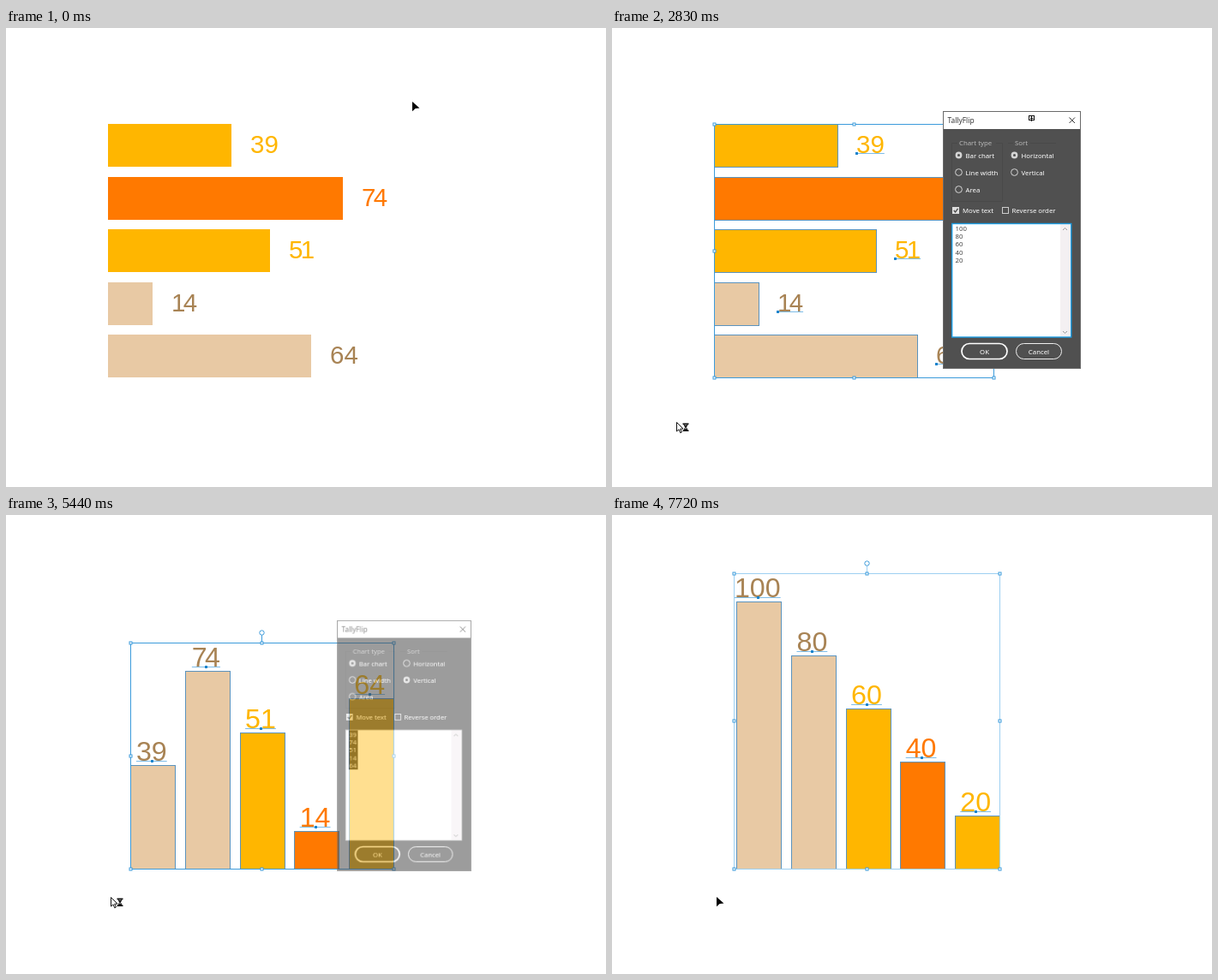
These frames come from a looping animation (700x536 px, 8 s). An HTML page with a canvas:

```html
<!DOCTYPE html>
<html lang="en">
<head>
<meta charset="utf-8">
<title>Bar chart editing</title>
<style>
html, body { margin: 0; width: 100%; height: 100%; overflow: hidden; background: #fff; }
canvas { display: block; }
</style>
</head>
<body>
<canvas id="stage" width="700" height="536"></canvas>
<script>
const stage = document.getElementById('stage').getContext('2d');
const panelCanvas = document.createElement('canvas');
const PANEL_W = panelCanvas.width = 161, PANEL_H = panelCanvas.height = 301;
const panel = panelCanvas.getContext('2d');
let ctx = stage;

const LOOP = 8000;
const YELLOW = '#ffb600', ORANGE = '#ff7900', TAN = '#e8c9a4', BROWN = '#a88354';
const BLUE = '#3c9bdb', PALE_BLUE = '#9dd0f2';
const BEFORE = [39, 74, 51, 14, 64], AFTER = [100, 80, 60, 40, 20];

// Times are in ms within the loop.
const scenes = [
  {
    start: 0, vertical: false, colors: [YELLOW, ORANGE, YELLOW, TAN, TAN],
    from: [474, 86], to: [75, 460], dialog: [386, 97],
    drag: 1030, select: 1430, wait: 1530, open: 1590, grip: 1900, paste: 2320,
    press: 3160, close: 3550, apply: 3880, done: 4420
  },
  {
    start: 4690, vertical: true, colors: [TAN, TAN, YELLOW, ORANGE, YELLOW],
    from: [512, 98], to: [122, 446], dialog: [384, 119],
    drag: 4690, select: 5095, wait: 5270, open: 5380, grip: 5600, paste: 6040,
    press: 6490, close: 6790, apply: 7090, done: 7720
  }
];

const clamp = x => Math.max(0, Math.min(1, x));
const smooth = x => x * x * (3 - 2 * x);
const easeOut = x => 1 - (1 - x) ** 2;

function fill(color, x, y, w, h) {
  ctx.fillStyle = color;
  ctx.fillRect(x, y, w, h);
}

function box(color, x, y, w, h, width = 1) {
  ctx.strokeStyle = color;
  ctx.lineWidth = width;
  ctx.strokeRect(x, y, w, h);
}

function line(color, width, ...points) {
  ctx.strokeStyle = color;
  ctx.lineWidth = width;
  ctx.beginPath();
  for (let i = 0; i < points.length; i += 2) ctx.lineTo(points[i], points[i + 1]);
  ctx.stroke();
}

function polygon(color, outline, ...points) {
  ctx.beginPath();
  for (let i = 0; i < points.length; i += 2) ctx.lineTo(points[i], points[i + 1]);
  ctx.closePath();
  ctx.fillStyle = color;
  ctx.fill();
  if (outline) {
    ctx.strokeStyle = outline;
    ctx.lineWidth = 1;
    ctx.stroke();
  }
}

function circle(x, y, r, color, paint = 'stroke') {
  ctx.beginPath();
  ctx.arc(x, y, r, 0, Math.PI * 2);
  ctx.lineWidth = 1;
  ctx[paint + 'Style'] = color;
  ctx[paint]();
}

function label(text, x, y, color, size = 7.8, align = 'left') {
  ctx.font = `${size}px "Noto Sans", sans-serif`;
  ctx.textAlign = align;
  ctx.fillStyle = color;
  ctx.fillText(text, x, y);
}

function layout(scene, values) {
  const { vertical } = scene;
  const size = vertical ? 32.2 : 29.5;
  return values.map((value, i) => {
    const text = String(value);
    const kern = text === '74' || !vertical && /^(51|14)$/.test(text) ? 2.7 : 0;
    const width = text.length * size * .556 - kern;
    if (vertical) {
      const h = Math.round(value * 3.115), x = Math.round(145 + 63.8 * i), y = 413 - h;
      return { text, size, kern, width, x, y, w: 52, h, tx: 169.8 + 63.6 * i - width / 2, ty: y - 4.7 };
    }
    const w = Math.round(value * 3.7), y = Math.round(112 + 61.5 * i);
    return { text, size, kern, width, x: 119, y, w, h: 50, tx: 119 + w + 22, ty: y + 34 };
  });
}

function drawChart(scene, values, selected) {
  const bars = layout(scene, values);
  bars.forEach((bar, i) => {
    const color = scene.colors[i];
    fill(color, bar.x, bar.y, bar.w, bar.h);
    ctx.font = `${bar.size}px "Liberation Sans", Arial, sans-serif`;
    ctx.textAlign = 'left';
    ctx.fillStyle = color === TAN ? BROWN : color;
    ctx.fillText(bar.text[0], bar.tx, bar.ty);
    ctx.fillText(bar.text.slice(1), bar.tx + bar.size * .556 - bar.kern, bar.ty);
  });
  if (selected) drawSelection(scene, bars, scene.vertical && values === AFTER ? PALE_BLUE : BLUE);
}

function drawSelection(scene, bars, frameColor) {
  for (const b of bars) {
    box('#5b93bd', b.x + .5, b.y + .5, b.w, b.h);
    const y = Math.round(b.ty) + .5;
    line('#7dbce8', 1, b.tx, y, b.tx + b.width, y);
    fill('#1a84cc', Math.round(scene.vertical ? b.tx + b.width / 2 - 1 : b.tx - 1), y - 1.5, 3, 3);
  }
  const grid = v => Math.round(v) + .5;
  let left = 119.5, top = 112.5, right, bottom = 408.5;
  if (scene.vertical) {
    left = grid(Math.min(145, bars[0].tx) - .5);
    right = 452.5;
    bottom = 413.5;
    top = grid(Math.min(...bars.map(b => b.ty)) - 28.6);
  } else {
    right = grid(Math.max(...bars.map(b => b.tx + b.width)) - .6);
  }
  const cx = grid((left + right) / 2 - 1), cy = grid((top + bottom) / 2 - 1);
  box(frameColor, left, top, right - left, bottom - top);
  const knob = scene.vertical ? [cx, top - 12] : [right + 12, cy];
  line(frameColor, 1, scene.vertical ? cx : right, scene.vertical ? top : cy, ...knob);
  circle(...knob, 2.7, '#fff', 'fill');
  circle(...knob, 2.7, BLUE);
  for (const x of [left, cx, right]) {
    for (const y of [top, cy, bottom]) {
      if (x === cx && y === cy) continue;
      fill('#fff', x - 1.5, y - 1.5, 3, 3);
      box(BLUE, x - 1.5, y - 1.5, 3, 3);
    }
  }
}

function radio(x, y, text, checked) {
  circle(x, y, 3.9, '#d5d5d5', checked ? 'fill' : 'stroke');
  if (checked) circle(x, y, 1.5, '#505050', 'fill');
  label(text, x + 8, y + 3, '#fff');
}

function button(x, text, width, color) {
  ctx.beginPath();
  ctx.roundRect(x, 271.5, 53, 18, 9);
  ctx.strokeStyle = color;
  ctx.lineWidth = width;
  ctx.stroke();
  label(text, x + 26.5, 283.5, '#fff', 7.8, 'center');
}

function paintPanel(scene, t) {
  const pasted = t >= scene.paste, pressed = t >= scene.press + 30;
  const focused = t >= scene.open + 100;

  fill('#fff', 0, 0, PANEL_W, 21);
  fill('#505050', 0, 21, PANEL_W, PANEL_H - 21);
  box('#6a6a6a', .5, .5, PANEL_W - 1, PANEL_H - 1);
  label('TallyFlip', 5.5, 13.7, '#333', 8.4);
  line('#333', 1, 147.5, 7.5, 154, 14);
  line('#333', 1, 154, 7.5, 147.5, 14);

  line('#494949', 1, 17, 37.5, 10.5, 37.5, 10.5, 105.5, 69.5, 105.5, 69.5, 37.5, 62, 37.5);
  line('#494949', 1, 76, 37.5, 82, 37.5);
  line('#494949', 1, 102, 37.5, 132, 37.5);
  label('Chart type', 19, 40.3, '#b8b8b8');
  label('Sort', 84, 40.3, '#b8b8b8');
  radio(18.5, 51.5, 'Bar chart', true);
  radio(18.5, 71.5, 'Line width', false);
  radio(18.5, 91.5, 'Area', false);
  radio(83.5, 51.5, 'Horizontal', !scene.vertical);
  radio(83.5, 71.5, 'Vertical', scene.vertical);

  fill('#dedede', 11, 112, 8, 8);
  line('#444', 1.3, 12.8, 116, 14.6, 118, 17.5, 113.8);
  label('Move text', 23, 119, '#fff');
  box('#ccc', 69.5, 112.5, 7, 7);
  label('Reverse order', 80.5, 119, '#fff');

  fill('#fff', 10, 131, 140, 133);
  fill('#f4f0f2', 137, 132, 12, 131);
  line('#999', 1, 140, 139, 142.5, 136.5, 145, 139);
  line('#999', 1, 140, 257, 142.5, 259.5, 145, 257);
  box(focused && !pressed ? '#1c9ce2' : '#999', 10.7, 131.5, 139, 132.5, focused ? 1.4 : .8);
  if (!pasted) fill(focused ? '#0a84de' : '#444', 14, 132, 11, 47);
  (pasted ? AFTER : BEFORE).forEach((value, i) =>
    label(value, 14.5, 139.8 + 9.3 * i, pasted ? '#444' : '#fff'));
  if (pasted && !pressed && (t - scene.paste) % 1020 < 510) fill('#222', 24, 169, 1, 9.5);

  button(22, 'OK', 1.7, pressed ? '#8fd0f5' : '#fff');
  button(85.5, 'Cancel', 1, '#eee');

  if (t >= scene.grip) {
    box('#111', 100.5, 5.5, 6, 5);
    line('#111', 1, 103.5, 6, 103.5, 12);
    line('#111', 1, 102, 8.5, 105.5, 8.5);
  }
}

// The panel is painted opaque on its own layer, then faded and scaled as one.
function drawDialog(scene, t) {
  const closing = clamp((t - scene.close) / 150);
  const shown = easeOut(clamp((t - scene.open) / 180)) * (1 - closing);
  if (shown <= 0) return;
  ctx = panel;
  paintPanel(scene, t);
  ctx = stage;
  const scale = .94 + .06 * shown;
  const w = PANEL_W * scale, h = PANEL_H * scale;
  const [x, y] = scene.dialog;
  ctx.globalAlpha = shown;
  ctx.drawImage(panelCanvas, x + (PANEL_W - w) / 2, y + (PANEL_H - h) / 2, w, h);
  ctx.globalAlpha = 1;
}

function drawMarquee(scene, [x, y]) {
  const [x0, y0] = scene.from;
  line('#d2d2d2', 1, Math.round(x), y0 + .5, x0 - .5, y0 + .5, x0 - .5, Math.round(y));
}

function drawCursor(scene, t, [x, y]) {
  ctx.save();
  ctx.translate(Math.round(x), Math.round(y));
  if (t < scene.wait || t >= scene.done) {
    polygon('#000', null, 0, 0, 8.5, 7.6, 3.6, 8, 0, 11.3);
  } else {
    polygon('#fff', '#111', .5, .5, .5, 11, 3, 8.8, 4.8, 12.8, 6.4, 12, 4.7, 8.2, 8, 8);
    if (t < scene.apply) {
      fill('#111', 7.5, 1.5, 7, 1.5);
      fill('#111', 7.5, 9.5, 7, 1.5);
      polygon('#fff', '#111', 8.8, 3, 13.2, 3, 11.4, 6.2, 13.2, 9.5, 8.8, 9.5, 10.6, 6.2);
      polygon('#111', null, 9, 4, 13, 4, 11, 6.5);
      polygon('#111', null, 9, 9.5, 13, 9.5, 11, 7.5);
    }
  }
  ctx.restore();
}

function draw(t) {
  fill('#fff', 0, 0, 700, 536);
  const scene = scenes[t < scenes[1].start ? 0 : 1];
  const pointerAt = time => {
    const k = smooth(clamp((time - scene.drag) / 365));
    return scene.from.map((v, i) => v + (scene.to[i] - v) * k);
  };
  drawChart(scene, t < scene.apply ? BEFORE : AFTER, t >= scene.select);
  if (t > scene.drag && t < scene.select) drawMarquee(scene, pointerAt(t - 10));
  drawDialog(scene, t);
  drawCursor(scene, t, pointerAt(t));
}

const startTime = performance.now();
function tick() {
  draw((performance.now() - startTime) % LOOP);
  requestAnimationFrame(tick);
}
tick();
</script>
</body>
</html>
```
